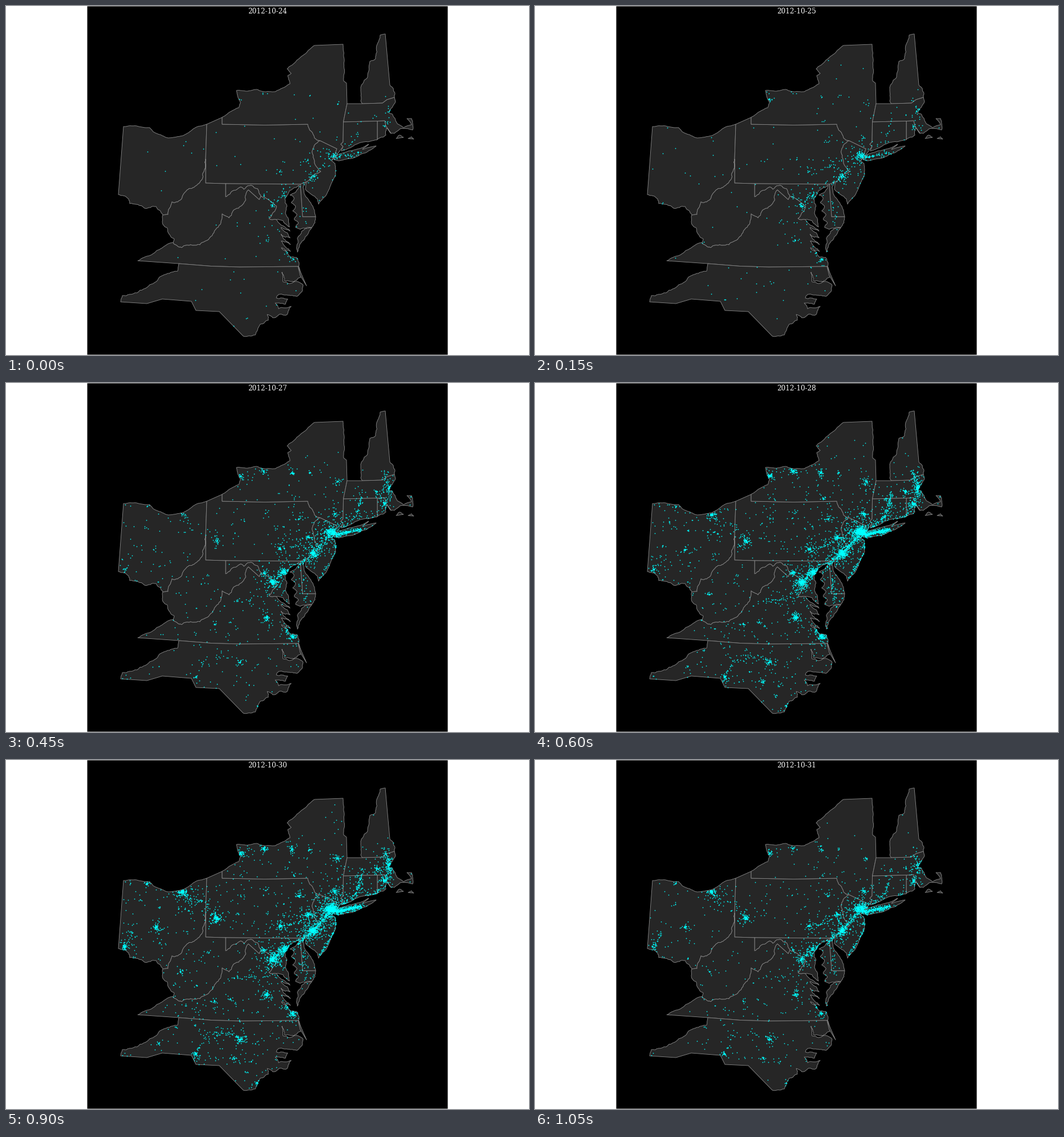
These frames come from a looping animation (917 px wide and 611 px high, 1200 ms). A matplotlib script:

```python
import numpy as np
import matplotlib.pyplot as plt
from matplotlib.animation import FuncAnimation
from matplotlib.collections import PolyCollection
from matplotlib.patches import Rectangle
from matplotlib.path import Path

W, H = 917, 611
DAYS, PEAK = 8, 5
STEP_MS = 150

rng = np.random.default_rng(12)


def split(a, b, wild):
    """Points from a up to b, bent by midpoint displacement."""
    d = b - a
    if np.hypot(*d) < 3.5:
        return [a]
    mid = (a + b) / 2 + np.array([-d[1], d[0]]) * rng.uniform(-wild, wild)
    return split(a, mid, wild) + split(mid, b, wild)


def rough(*pts, wild=0.14):
    pts = [np.array(p, float) for p in pts]
    out = []
    for a, b in zip(pts, pts[1:]):
        out += split(a, b, wild)
    return out + [pts[-1]]


def inlets(a, b, count, reach):
    """Tidal shore from a to b, cut by narrow inlets running along reach."""
    a, b, reach = (np.array(p, float) for p in (a, b, reach))
    pts = []
    for k in range(count):
        for t, depth in ((0.1, 0), (0.5, 1), (0.65, 0.85)):
            pts.append(a + (b - a) * (k + t) / count + reach * depth)
    return rough(*pts, b)


# Shared borders
ohio_river = rough(
    (350, 268), (347, 290), (338, 311), (314, 326), (301, 343), (291, 343),
    (284, 365), (275, 366))
tug_fork = rough((275, 366), (274, 378), (288, 402), (295, 408), (293, 414))
ridge = rough(
    (293, 414), (308, 423), (340, 418), (357, 406), (379, 364), (391, 371),
    (408, 354), (425, 322)) + [(444, 339), (447, 333)]
upper_potomac = rough(
    (385, 334), (411, 317), (417, 321), (430, 314), (441, 320), (447, 333))
mid_potomac = rough((447, 333), (469, 346), (474, 350), (461, 372), (474, 374))
upper_delaware = rough((529, 207), (535, 219), (541, 231), (551, 236))
lower_delaware = rough(
    (551, 236), (540, 247), (537, 257), (541, 272), (552, 290), (528, 307))
hudson = [(551, 236), (580, 250), (575, 264), (571, 271)]
ny_south = [(379, 207), (454, 208.5), (529, 207)]
ct_west = [(591.5, 203), (591, 238), (587, 242), (591, 246)]
ct_north = [(591.5, 203), (651, 201.5)]
ri_west = [(651, 201.5), (651, 234)]
ri_east = [(664, 201), (666, 210), (675, 223)]
nh_south = [(625, 171), (660, 170), (668, 164), (681, 160)]
va_south = [(303, 451), (360, 455.5), (410, 457), (513, 456)]
de_west = [(516, 312), (520, 369), (543, 369)]

ohio = rough(
    (206, 211), (252, 213), (258, 220), (284, 231), (310, 227), (336, 211),
    (352, 207), wild=0.05) + ohio_river + rough(
    (275, 366), (263, 351), (243, 354), (217, 346), (215, 338), (197, 330))

pennsylvania = [(352, 207), (379, 195)] + ny_south + upper_delaware \
    + lower_delaware + [(517, 312), (385, 311), (350, 310), (350, 268)]

new_york = ny_south + upper_delaware + hudson + [(579, 262)] + ct_west[::-1] + [
    (598, 171), (597, 135)] + rough(
    (597, 135), (592, 131), (593, 97), (591, 67), wild=0.06) + rough(
    (541, 69), (516, 90), (493, 110), (500, 118), (494, 122), (498, 136),
    (472, 150), (440, 146), (404, 148), (411, 168), (408, 178), (379, 195),
    wild=0.07)

long_island = rough(
    (575, 269), (580, 262), (600, 254), (622, 249), (636, 242), (625, 251),
    (649, 245), (612, 265), (583, 271), wild=0.05)

new_hampshire = rough(
    (665, 49), (656, 51), (650, 69), (648, 92), (638, 97), (634, 124),
    (628, 130), (622, 166), (625, 171), wild=0.1) + nh_south + rough(
    (681, 160), (682, 154), (673, 138))

massachusetts = [(598, 171)] + nh_south + rough(
    (681, 160), (683, 167), (671, 187), (677, 189), (686, 206), (697, 213),
    (711, 208), (703, 197), (711, 197), (713, 217), (691, 215), (681, 223),
    (675, 223), wild=0.08) + ri_east[::-1] + ct_north[::-1]

rhode_island = ri_west[::-1] + ri_east + rough(
    (675, 223), (667, 214), (666, 226), (651, 234))

connecticut = ct_north + ri_west + rough(
    (651, 234), (619, 240), (588, 254), (591, 246), wild=0.06) + ct_west[::-1]

new_jersey = hudson + rough(
    (571, 271), (577, 276), (578, 295), (563, 328), (548, 347), (546, 338),
    (525, 321), (528, 307), wild=0.07) + lower_delaware[::-1]

delaware = de_west + rough(
    (543, 369), (541, 358), (525, 333), (521, 318), (526, 308), (516, 312),
    wild=0.07)

maryland = [(385, 311)] + de_west + rough(
    (543, 369), (536, 388), (516, 391)) + inlets(
    (508, 389), (498, 331), 4, (6, -2)) + rough(
    (498, 331), (513, 319), (514, 314), (497, 323), (489, 338), (490, 363),
    (497, 387), (486, 376), (474, 374)) + mid_potomac[::-1] \
    + upper_potomac[::-1]

west_virginia = ohio_river + tug_fork + ridge + upper_potomac[::-1] + [
    (385, 311), (350, 310)]

virginia = rough(
    (231, 446), (256, 435), (273, 424), (293, 414), wild=0.08) + ridge \
    + mid_potomac + rough((474, 374), (480, 381), (496, 391)) + inlets(
    (498, 393), (499, 440), 4, (-16, -11)) + rough(
    (499, 440), (509, 440), (513, 456)) + va_south[::-1]

eastern_shore = rough(
    (536, 388), (522, 410), (511, 431), (510, 420), (518, 395), (524, 390))

north_carolina = va_south + rough(
    (513, 456), (518, 474), (510, 480), (488, 481), (484, 466), (486, 483),
    (498, 486), (513, 483), (521, 489), (519, 500), (511, 508), (478, 505),
    (474, 511), (494, 513), (490, 522), (472, 520), (478, 530), (500, 526),
    (493, 540), (468, 546), (458, 540), (460, 550), (446, 557), (437, 576),
    (416, 578)) + [
    (374, 535), (333, 533), (325, 517), (274, 513), (247, 521)] + rough(
    (201, 518), (204, 507), (252, 488), (272, 473), (301, 464), (303, 451))

outer_banks = [(512, 456), (520, 474), (527, 490), (516, 472)]
vineyard = rough((684, 232), (690, 226), (697, 230))
nantucket = rough((705, 232), (711, 229), (715, 233))

states = [ohio, pennsylvania, new_york, long_island, new_hampshire,
          massachusetts, rhode_island, connecticut, new_jersey, delaware,
          maryland, west_virginia, virginia, eastern_shore, north_carolina,
          outer_banks, vineyard, nantucket]
land = [Path(list(s) + [s[0]]) for s in states]


def share(day, rise, fall):
    """Part of the peak crowd that is out on a day."""
    return np.exp(-rise * max(PEAK - day, 0) - fall * max(day - PEAK, 0))


def around(centres, spread):
    tail = rng.gamma(1.1, 0.9, (len(centres), 1))
    return centres + rng.normal(0, spread, centres.shape) * tail


def city(x, y, people):
    return around(np.tile([x, y], (people, 1)), 1.35 * people ** 0.23)


def corridor(pts, people, spread):
    pts = np.array(pts, float)
    far = np.r_[0, np.cumsum(np.hypot(*np.diff(pts, axis=0).T))]
    at = rng.uniform(0, far[-1], people)
    line = np.c_[np.interp(at, far, pts[:, 0]), np.interp(at, far, pts[:, 1])]
    return around(line, spread)


def countryside(people, hamlets):
    loose = rng.uniform((197, 60), (715, 578), (people, 2))
    seeds = rng.uniform((197, 142), (715, 578), (hamlets, 2))
    pts = np.vstack([loose, around(np.repeat(seeds, 7, axis=0), 3)])
    return pts[(pts[:, 1] > 142) | (rng.random(len(pts)) < 0.4)]


# Each crowd: rise and fall rates, then its places
crowds = [
    (0.62, 0.58, [
        city(574, 262, 1000), city(566, 260, 500), city(538, 298, 650),
        city(529, 270, 130), city(480, 290, 110), city(576, 229, 110),
        city(514, 238, 50),
        corridor([(578, 265), (622, 256)], 750, 2.5),
        corridor([(577, 277), (578, 295), (550, 342)], 150, 1.5),
        corridor([(467, 349), (487, 331), (521, 313), (538, 298), (568, 266)],
                 850, 5),
        corridor([(478, 295), (530, 275), (570, 250)], 260, 13)]),
    (0.6, 0.85, [
        city(467, 349, 480), city(487, 331, 260), city(452, 332, 90),
        city(456, 410, 190), city(502, 443, 300), city(493, 432, 90),
        corridor([(400, 382), (458, 376), (462, 350)], 110, 8),
        corridor([(519, 340), (526, 380)], 90, 7)]),
    (0.72, 0.85, [
        city(672, 184, 420), city(663, 211, 160), city(650, 190, 80),
        city(581, 172, 110), city(411, 163, 180), city(452, 154, 130),
        city(501, 157, 80), city(532, 157, 30), city(505, 202, 30),
        corridor([(590, 252), (612, 235), (620, 213), (624, 190)], 330, 5),
        corridor([(612, 243), (650, 232), (670, 205), (672, 184), (662, 155)],
                 420, 8)]),
    (1.3, 0.6, [
        city(309, 230, 330), city(263, 292, 140), city(208, 327, 90),
        city(247, 216, 45), city(370, 277, 240), city(305, 370, 30),
        corridor([(310, 230), (320, 246), (347, 246), (370, 277)], 150, 6),
        corridor([(208, 327), (221, 302)], 70, 6)]),
    (0.95, 0.65, [
        city(410, 489, 130), city(332, 514, 120), city(400, 522, 40),
        city(440, 565, 35), city(365, 422, 30), city(393, 418, 20),
        city(268, 496, 15),
        corridor([(333, 512), (352, 477), (395, 478), (410, 489)], 120, 5)]),
    (0.75, 0.75, [countryside(1900, 150)]),
]


def on_land(pts):
    return pts[np.any([p.contains_points(pts) for p in land], axis=0)]


crowds = [(rise, fall, on_land(np.vstack(parts))) for rise, fall, parts in crowds]


def dots_for(day):
    return np.vstack([pts[rng.random(len(pts)) < share(day, rise, fall)]
                      for rise, fall, pts in crowds])


days = [dots_for(d) for d in range(DAYS)]

fig = plt.figure(figsize=(W / 72, H / 72), dpi=72, facecolor="white")
ax = fig.add_axes([0, 0, 1, 1])
ax.set_xlim(0, W)
ax.set_ylim(H, 0)
ax.axis("off")
ax.add_patch(Rectangle((142.5, 0.5), 632, 610, fc="black", lw=0, snap=False))
ax.add_collection(PolyCollection(states, facecolor="#262626", edgecolor="#858585",
                                 linewidth=0.9), autolim=False)
dots = ax.scatter([], [], s=2.9, c="cyan", linewidths=0, zorder=3)
title = ax.text(W / 2, 13, "", color="white", family="DejaVu Serif", size=12,
                ha="center", va="baseline", zorder=4)


def draw(day):
    dots.set_offsets(days[day])
    title.set_text(f"2012-10-{24 + day}")
    return dots, title


anim = FuncAnimation(fig, draw, frames=DAYS, init_func=lambda: draw(0),
                     interval=STEP_MS, repeat=True, repeat_delay=0)
plt.show()
```
